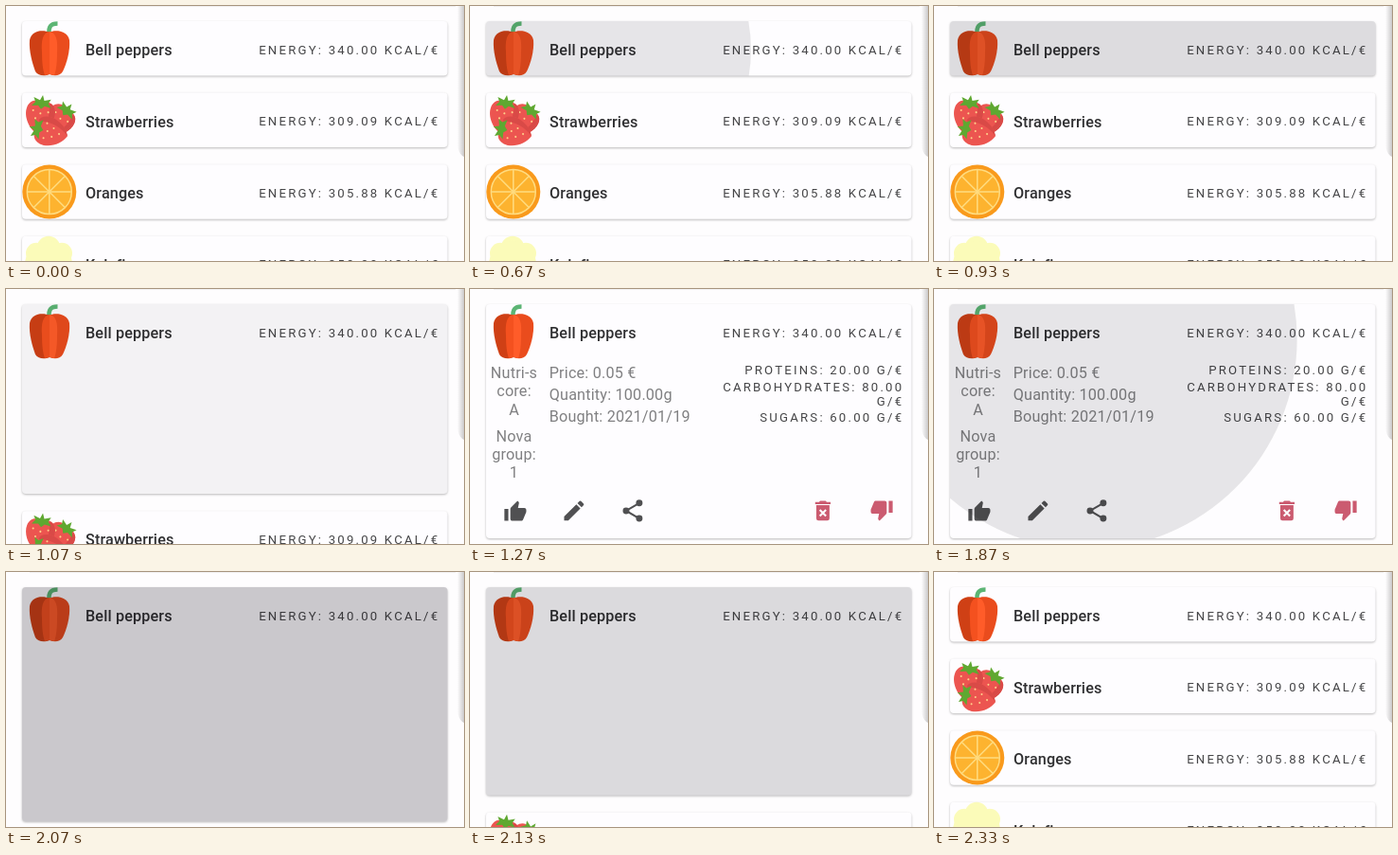
These frames come from a looping animation (484 by 269 pixels, 2.99 s). An HTML page:

```html
<!DOCTYPE html>
<html lang="en">
<head>
<meta charset="utf-8">
<style>
html, body { margin: 0; width: 100%; height: 100%; overflow: hidden; background: #fefdfe; }
svg { display: block; width: 100vw; height: 100vh; font-family: Roboto, sans-serif; }
.card { fill: #fefdff; filter: drop-shadow(0 1px 1px #0004); }
.name { font-size: 16.2px; font-weight: 500; letter-spacing: .14px; fill: #303032; }
.fact { font-size: 13.2px; letter-spacing: 2.2px; text-anchor: end; fill: #464648; }
.body { font-size: 16.2px; letter-spacing: .19px; fill: #808082; }
.mid { text-anchor: middle; }
</style>
</head>
<body>
<svg id="stage" viewBox="0 0 484 269" preserveAspectRatio="none">
  <defs>
    <linearGradient id="edge"><stop stop-color="#0000"/><stop offset="1" stop-color="#0003"/></linearGradient>
    <clipPath id="clip"><rect id="clipBox" x="17" y="16" width="449.5" rx="4"/></clipPath>
    <g id="berry">
      <path fill="#ec5550" d="M0 17C-8 14-15 3-13-6-11-14-4-14 0-12 4-14 11-14 13-6 15 3 8 14 0 17Z"/>
      <path fill="#d94a47" d="M0 17C8 14 15 3 13-6 12-10 10-12 7-12 10 0 6 10 0 17Z"/>
      <g id="seeds" fill="#ffd08a"></g>
      <path fill="#5fa831" d="M0-19L2-14 8-16 6-12 9-8 3-9 0-6-3-9-9-8-6-12-8-16-2-14Z"/>
    </g>
    <path id="thumb" d="M1 21h4V9H1zM23 10c0-1.1-.9-2-2-2h-6.3l1-4.9c0-.4-.2-.8-.5-1.1L14.2 1 7.6 7.6C7.2 8 7 8.5 7 9v10c0 1.1.9 2 2 2h9c.8 0 1.500-.5 1.800-1.200l3-7.100c.1-.2.2-.5.2-.7z"/>
  </defs>
  <rect width="450" height="1" x="25" fill="#f0eff0"/>
  <path d="M477 0h7v159q-4-1-7-10z" fill="url(#edge)"/>
  <g id="rows"></g>
  <g id="first"></g>
  <g id="details">
    <g id="facts"></g>
    <g fill="#505052">
      <use href="#thumb" transform="translate(35.300 222.500) scale(1.05)"/>
      <path transform="translate(96 220) scale(1.16)" d="M3 17.250V21h3.750L17.800 9.900 14.100 6.200ZM20.700 7q.6-.7 0-1.400L18.400 3.300q-.7-.6-1.400 0L15.100 5.100 18.900 8.900Z"/>
      <g transform="translate(158 220) scale(1.16)">
        <path d="M18 5L6 12 18 19" fill="none" stroke="#505052" stroke-width="1.800"/>
        <circle cx="18" cy="5" r="3"/><circle cx="6" cy="12" r="3"/><circle cx="18" cy="19" r="3"/>
      </g>
    </g>
    <g fill="#cb5b70">
      <g transform="translate(359 220) scale(1.16)">
        <path d="M6 19q0 2 2 2h8q2 0 2-2V7H6zM15.500 4l-1-1h-5l-1 1H5v2h14V4z"/>
        <path d="M9.200 11.200l5.600 5.600m0-5.600l-5.600 5.600" stroke="#fff" stroke-width="1.800"/>
      </g>
      <use href="#thumb" transform="translate(447.700 245.500) rotate(180) scale(1.05)"/>
    </g>
  </g>
  <g clip-path="url(#clip)"><circle id="ripple" fill="#0a0810"/></g>
</svg>
<script>
const $ = id => document.getElementById(id);
const text = (cls, x, y, s) => `<text class="${cls}" x="${x}" y="${y}">${s}</text>`;
const fact = (y, s) => text('fact', 458.3, y, s);
const berry = (x, y, turn) =>
  `<use href="#berry" transform="translate(${x} ${y}) rotate(${turn}) scale(1.15)"/>`;

// Icons are drawn relative to their card's top edge.
const pepper = `
  <path fill="none" stroke="#5cb574" stroke-width="4.500" d="M45.500 13C45 6 47 2.500 54.500 2.500"/>
  <path fill="#cf4015" d="M46 12C40 9 27 9 25 20 24 31 28 45 31 53 34 58 41 58 46 56Z"/>
  <path fill="#ea4c1d" d="M46 12C50 9 65 9 67 20 68 31 64 45 60 53 57 58 51 58 46 56Z"/>
  <path fill="#f4511f" d="M46 11C39 12 37 20 38 33 38 44 39 52 41 57L46 56Z"/>
  <path fill="#ff5c29" d="M46 11C53 12 55 20 54 33 54 44 53 52 51 57L46 56Z"/>`;
const berries = berry(56, 29, 38) + berry(36, 24, 8) + berry(46, 41, -76);
const spokes = Array.from({length: 8}, (_, i) =>
  `<path d="M0 0V-23" transform="rotate(${i * 45})"/>`).join('');
const orange = `<g transform="translate(45.800 28.800)" stroke="#ffdc80" stroke-width="1.500">
  <circle r="28.500" fill="#f99a1c" stroke="none"/>
  <circle r="23.500" fill="#fdb32f"/>${spokes}</g>`;
const cauliflower = `<g fill="#fbfbb9"><circle cx="45" cy="12.500" r="12.500"/><circle cx="32" cy="18" r="11"/>
  <circle cx="59" cy="18" r="11"/><circle cx="45" cy="30" r="25"/></g>`;

const items = [
  ['Bell peppers', '340.00', pepper],
  ['Strawberries', '309.09', berries],
  ['Oranges', '305.88', orange],
  ['Kalafior', '250.00', cauliflower],
];
const row = ([name, energy, icon], i) => `<g transform="translate(0 ${16 + i * 75.6})">
  <rect class="card" x="17" width="449.500" height="57.500" rx="4"/>${icon}
  ${text('name', 84, 36, name)}${fact(34.5, `ENERGY: ${energy} KCAL/€`)}</g>`;

$('seeds').innerHTML = [[-7, -4], [0, -2], [7, -4], [-4, 3], [4, 3], [0, 9]]
  .map(([x, y]) => `<circle cx="${x}" cy="${y}" r=".9"/>`).join('');
$('first').innerHTML = row(items[0], 0);
$('rows').innerHTML = items.slice(1).map((item, i) => row(item, i + 1)).join('');
$('facts').innerHTML =
  [[94, 'Nutri-s'], [113, 'core:'], [132.5, 'A'], [160.5, 'Nova'], [179.5, 'group:'], [199, '1']]
    .map(([y, s]) => text('body mid', 46.5, y, s)).join('') +
  ['Price: 0.05 €', 'Quantity: 100.00g', 'Bought: 2021/01/19']
    .map((s, i) => text('body', 83.7, 94 + i * 23, s)).join('') +
  fact(90, 'PROTEINS: 20.00 G/€') + fact(107.5, 'CARBOHYDRATES: 80.00') +
  fact(123, 'G/€') + fact(140, 'SUGARS: 60.00 G/€');

const ramp = (t, a, b) => Math.min(1, Math.max(0, (t - a) / (b - a)));
const ease = p => (1 - Math.cos(Math.PI * p)) / 2;
const set = (el, attrs) => { for (const k in attrs) el.setAttribute(k, attrs[k]); };
const card = $('first').querySelector('.card');

// Each press: start, end of growth, end of fade, centre, first radius, first and last opacity.
const presses = [
  [667, 933, 1133, 130, 46, 167, .095, .135],
  [1800, 2067, 2267, 162, 53, 135, .055, .21],
];

function draw(now) {
  // The picture advances 15 times a second.
  const t = Math.floor((now % 2990 + 4) * .015) / .015;
  const open = ease(ramp(t, 933, 1133)) - ease(ramp(t, 2067, 2333));
  const height = 57.5 + 189.5 * open;
  set(card, {height});
  set($('clipBox'), {height});
  set($('rows'), {transform: `translate(0 ${189.5 * open})`});
  set($('details'), {opacity: ramp(t, 1067, 1266) - ramp(t, 1867, 2066)});

  const [start, full, end, cx, cy, r, a, b] = presses[t < 1500 ? 0 : 1];
  const opacity = t < start - 1 ? 0 : (a + (b - a) * ramp(t, start, full)) * (1 - ramp(t, full, end));
  set($('ripple'), {cx, cy, r: r + Math.max(0, t - start) * 1.3, opacity});
  requestAnimationFrame(draw);
}
requestAnimationFrame(draw);
</script>
</body>
</html>
```
